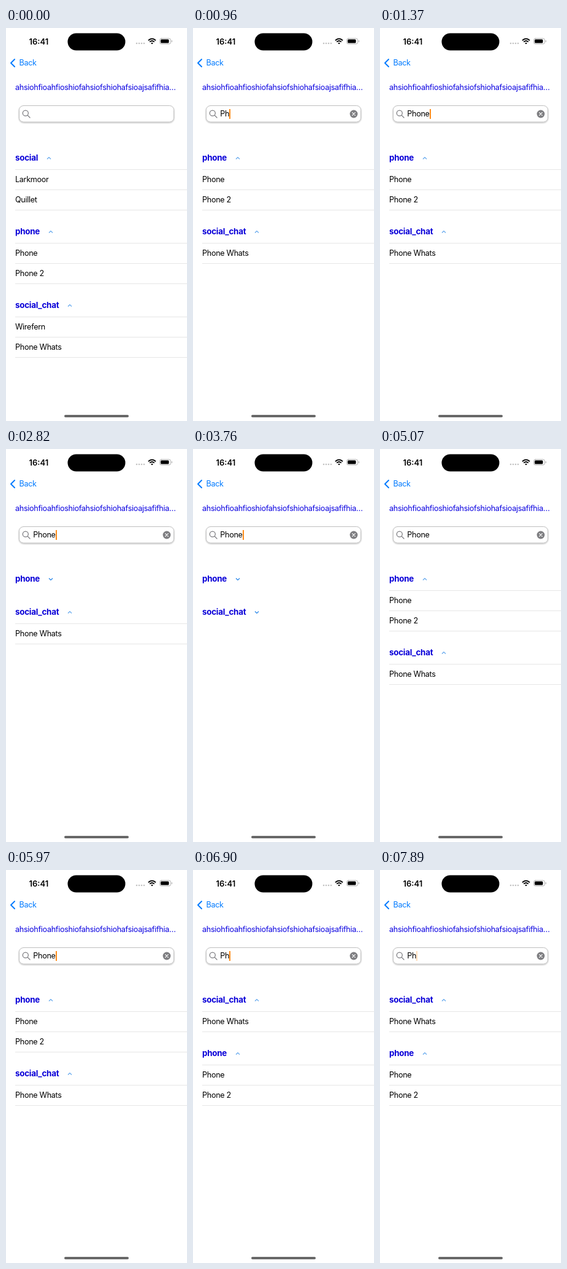
An HTML page that plays this animation: 295x640 px, repeating every 8 s.

```html
<!DOCTYPE html>
<html lang="en">
<head>
<meta charset="utf-8">
<title>Search list</title>
<style>
  html, body { margin: 0; width: 100%; height: 100%; overflow: hidden; background: #fff; }
  body { position: relative; font: 12.6px/20px Inter, sans-serif; letter-spacing: -.3px; color: #000; }
  body > svg { position: absolute; left: 0; top: 0; }
  .text, .line { position: absolute; left: 15px; white-space: pre; }
  .blue { color: #0a00e0; }
  .head { font-weight: 700; font-size: 13.4px; letter-spacing: -.25px; color: #0a00d8; }
  .head svg { position: absolute; left: 100%; top: 7px; margin-left: 13.5px; }
  .line { width: 280px; height: 1px; background: #e6e6e6; }
  #caret { position: absolute; left: 100%; top: 2px; width: 2px; height: 16px; background: #ff8c1a; }
</style>
</head>
<body>
<svg width="295" height="640" fill="none" stroke-linecap="round" stroke-linejoin="round">
  <defs>
    <filter id="shadow" x="-5%" y="-20%" width="110%" height="150%">
      <feDropShadow dx="0" dy="1" stdDeviation=".8" flood-opacity=".3"/>
    </filter>
  </defs>
  <rect x="100.5" y="8.5" width="94" height="28" rx="14" fill="#000"/>
  <g fill="#c4c4c4">
    <circle cx="213" cy="25" r="1.3"/><circle cx="217" cy="25" r="1.3"/>
    <circle cx="221" cy="25" r="1.3"/><circle cx="225" cy="25" r="1.3"/>
  </g>
  <g stroke="#000" stroke-width="1.9" stroke-linecap="butt">
    <path d="M232 20.2Q238 14.8 244 20.2M234.2 22.6Q238 19.2 241.8 22.6"/>
    <path d="M236.2 24.4Q238 23 239.8 24.4L238 26.4Z" fill="#000" stroke="none"/>
  </g>
  <rect x="250.5" y="17" width="18" height="9" rx="2.8" stroke="#aaa" stroke-width=".9"/>
  <rect x="252" y="18.5" width="13.5" height="6" rx="1.5" fill="#000"/>
  <path d="M270.4 20.5v2" stroke="#aaa"/>
  <path d="M14 51L8 57L14 63" stroke="#007aff" stroke-width="1.9"/>
  <rect x="21.5" y="126.5" width="252" height="26.5" rx="7" fill="#fff" stroke="#c2c2c2" filter="url(#shadow)"/>
  <g stroke="#7c7c80" stroke-width="1.3">
    <circle cx="31.8" cy="138.7" r="4.5"/><path d="M35.2 142.1L39 146"/>
  </g>
  <g id="clear">
    <circle cx="262" cy="140" r="6.4" fill="#7f7f82"/>
    <path d="M259.7 137.7l4.6 4.6m0-4.6l-4.6 4.6" stroke="#fff" stroke-width="1.2"/>
  </g>
  <rect x="95" y="630" width="105" height="4" rx="2" fill="#686868"/>
</svg>
<div class="text" style="left:37.5px;top:12px;font-size:13px;font-weight:600;letter-spacing:0">16:41</div>
<div class="text" style="left:21.5px;top:47px;color:#007aff">Back</div>
<div class="text blue" style="top:87px">ahsiohfioahfioshiofahsiofshiohafsioajsafifhia…</div>
<div class="text" style="left:44.3px;top:130px;height:20px"><span id="query"></span><i id="caret"></i></div>
<div id="list"></div>

<script>
const LOOP = 8000;
const groups = {
  social: ['Larkmoor', 'Quillet'],
  phone: ['Phone', 'Phone 2'],
  social_chat: ['Wirefern', 'Phone Whats'],
};

// Each timeline holds [start in ms, value]; a trailing "-" marks a closed group.
const typing = [[0, ''], [650, 'P'], [960, 'Ph'], [1070, 'Pho'], [1250, 'Phon'], [1370, 'Phone'], [6900, 'Ph']];
const layouts = [
  [0, 'social phone social_chat'], [960, 'phone social_chat'], [2820, 'phone- social_chat'],
  [3760, 'phone- social_chat-'], [4950, 'phone social_chat'], [6900, 'social_chat phone'],
];
const blink = [
  [0, 0], [110, .6], [650, 1], [1880, .5], [1990, 0], [2270, .2], [2380, .5],
  [2820, 1], [2930, .5], [3050, 0], [3260, .2], [3380, .5], [3760, 1], [3930, .5], [4050, 0],
  [4290, .2], [4410, .5], [4950, 1], [5070, 0], [5320, .2], [5430, .5], [5970, 1], [6100, 0],
  [6490, .5], [6900, 1], [7410, .5], [7530, 0], [7770, .15], [7890, .3],
];

const $ = id => document.getElementById(id);
const valueAt = (steps, t) => steps.findLast(([start]) => start <= t)[1];
const text = (y, content, type = '') => `<div class="text ${type}" style="top:${y - 10}px">${content}</div>`;
const line = y => `<div class="line" style="top:${y}px"></div>`;
const chevron = open => `<svg width="8" height="8" fill="none" stroke-width="1.2" stroke="${open ? '#64a8ee' : '#2585e8'}">
  <path d="${open ? 'M1 5.5L4 2.5L7 5.5' : 'M1 2.5L4 5.5L7 2.5'}"/></svg>`;

function listHtml(layout) {
  const filtered = !layout.startsWith('social ');
  let y = 211, html = '';
  for (const entry of layout.split(' ')) {
    const name = entry.replace('-', ''), open = name === entry;
    html += text(y, name + chevron(open), 'head');
    if (open) {
      const items = groups[name].filter(item => !filtered || item.startsWith('Ph'));
      html += line(y + 19);
      items.forEach((item, i) => html += text(y + 35.7 + 33 * i, item) + line(y + 52 + 33 * i));
      y += 33 * items.length;
    }
    y += 54;
  }
  return html;
}

let shown;
function draw() {
  const t = performance.now() % LOOP;
  const query = valueAt(typing, t), layout = valueAt(layouts, t);
  if (layout !== shown) $('list').innerHTML = listHtml(shown = layout);
  $('query').textContent = query;
  $('clear').style.visibility = query ? 'visible' : 'hidden';
  $('caret').style.opacity = valueAt(blink, t);
  requestAnimationFrame(draw);
}
draw();
</script>
</body>
</html>
```
